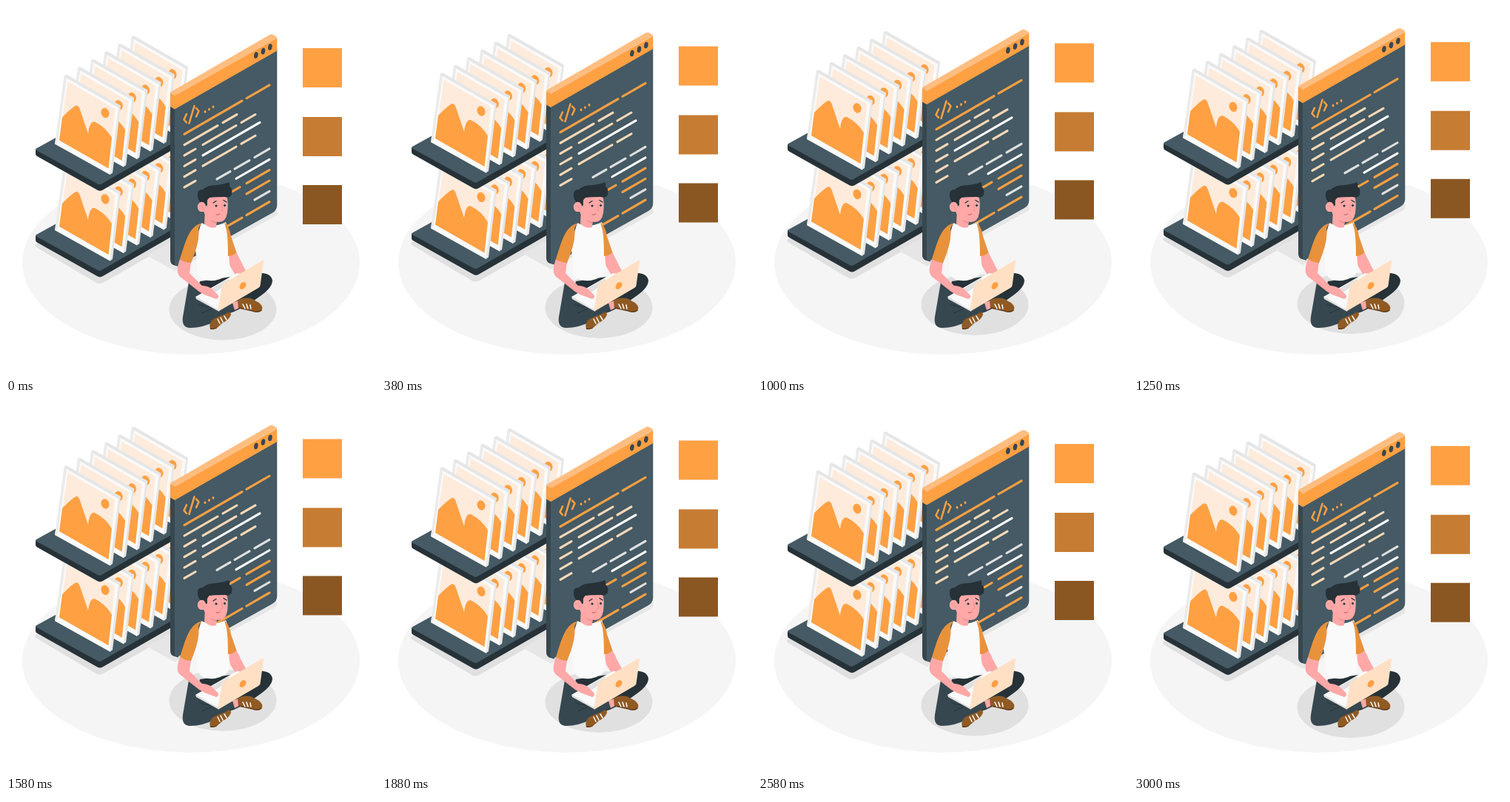
These frames come from a looping animation (500x500 px, 3.04 s). An HTML page:

```html
<!DOCTYPE html>
<html lang="en">
<head>
<meta charset="utf-8">
<title>Developer at work</title>
<style>
html, body { margin: 0; width: 100%; height: 100%; overflow: hidden; background: #fff; }
svg { display: block; width: 100vw; height: 100vh; }
.line { fill: none; stroke-linecap: round; stroke-linejoin: round; }
</style>
</head>
<body>
<svg viewBox="0 0 500 500">
  <defs>
    <g id="photo">
      <path fill="#e6e6e6" d="M78.500 95L80 93L82.500 93L155 134.500L144 225.500L140.500 228L100 190Z"/>
      <path fill="#fafafa" d="M79.500 96L152 137.500L140.500 228L66 186.500Z"/>
      <path fill="#ebebeb" d="M78.500 95L82 98L69.500 184L66 186.500Z"/>
      <path fill="#ffebdb" d="M83.500 102L147.500 139L138.500 219.500L72 181.500Z"/>
      <path fill="#ffa043" d="M76 150.500Q90 136 95 134.500Q98 134 100 140L111 172.500Q113 155 120 156.500Q135 164 143 178L138.500 219.500L72 181.500Z"/>
      <ellipse fill="#ffa043" cx="134" cy="144.500" rx="5.400" ry="6.800" transform="rotate(-20 134 144.500)"/>
    </g>
    <g id="shelf">
      <path fill="#263238" d="M40 194V200Q40 202 42 203L124 249Q127 250.500 130 249L224 195V184L127 238Z"/>
      <path fill="#455a64" d="M41 195Q39 194 41 192.500L120 149H224V186L129 240.500Q127 242 124 240.500Z"/>
      <g class="row"></g>
    </g>
  </defs>

  <ellipse cx="250" cy="347" rx="228" ry="124" fill="#f5f5f5"/>

  <g id="float">
    <g fill="#e0e0e0">
      <path d="M41 321Q37 323 41 326L122 374Q126 376 131 374L226 320V300Z"/>
      <path fill="#e6e6e6" d="M190 337L228 358L364 284Q368 281 366 276L330 260Z"/>
      <ellipse cx="293" cy="410" rx="72.500" ry="41.500"/>
    </g>

    <use href="#shelf" y="116.400"/>
    <use href="#shelf"/>

    <path fill="#37474f" d="M222 130V343Q222 348 226 350L233 352V130Z"/>
    <path fill="#455a64" d="M228 136V347Q228 353 234 350L360 279.500Q366.300 276 366.300 269V58Z"/>
    <path fill="#ffa043" d="M222 117L228 121L366.300 43V60.500L228 139.500L222 136Z"/>
    <path fill="#ffbd80" d="M222 116.500L356 39Q358.500 37.500 361 38.800L365 41Q367 42.500 365 43.500L228 121.500Z"/>
    <g fill="#37474f">
      <ellipse cx="338" cy="66.500" rx="2.700" ry="4.400" transform="rotate(12 338 66)"/>
      <ellipse cx="347.500" cy="61" rx="2.700" ry="4.400" transform="rotate(12 347 61)"/>
      <ellipse cx="357" cy="55.500" rx="2.700" ry="4.400" transform="rotate(12 357 55)"/>
    </g>
    <path class="line" stroke="#ffa043" stroke-width="2.500" d="M244 146L240.500 153.500L244 157.500M254.500 135L247.500 158.500M257 138L260.500 142L257 149.500"/>
    <path class="line" stroke="#ffa043" stroke-width="2.800" d="M269 142.500v.8M274.500 139.300v.8M280 136v.8"/>
    <g id="code" class="line" stroke-width="3.100"></g>

    <rect x="401" y="57" width="53" height="53" fill="#ffa043"/>
    <rect x="401" y="150" width="53" height="53" fill="#c67c33"/>
    <rect x="401" y="242" width="53" height="53" fill="#8a5723"/>
  </g>

  <g id="person">
    <!-- legs and shoes -->
    <path fill="#263238" d="M262 372L338 361Q358 359 360 371Q360 380 345 391Q320 410 297 417L270 428L254 410Z"/>
    <path fill="#37474f" d="M247 373L239 420Q237 434 248 435Q266 435 283 426L313 408L308 399L286 405L268 378Z"/>
    <path class="line" stroke="#263238" stroke-width="1" d="M286 405Q270 409 261 403M286 405L265 415"/>
    <path fill="#ffa8a7" d="M306 401L314 398L315 408L309 411Z"/>
    <path fill="#8f5a24" d="M276 437Q273 427 282 422L297 416Q304 411 304 417Q302 424 293 428L284 436Z"/>
    <path fill="#8f5a24" d="M313 398Q320 393 331 395L342 401Q349 407 345 412Q340 415 332 411L314 408Z"/>
    <path class="line" stroke="#5f3a16" stroke-width="1.500" d="M315 408L333 412Q341 415 345 411M277 436Q281 437 284 435"/>
    <path class="line" stroke="#fff" stroke-width="1.500" d="M286 423L289 429M290 421L293 427M295 419L298 424M320 403L323 409M325 403L327 409M330 404L331 409"/>

    <!-- torso and arms -->
    <path fill="#ffa8a7" d="M300 337L311 332L322 354L326 360L312 367L303 352Z"/>
    <path fill="#fafafa" d="M264 293Q280 301 297 292Q303 304 301 324L302 358Q298 368 282 371Q270 372 263 367Q257 361 258 345L255 322Z"/>
    <path fill="#e8923c" d="M266 293C248 297 244 314 235 342Q242 347 250 347.500C258 328 262 312 260 301Q261 296 266 293Z"/>
    <path fill="#e8923c" d="M295 292Q302 298 304 311L311.500 333Q307 338 300 338Q300 315 298 303Z"/>

    <!-- head -->
    <path fill="#ffa8a7" d="M269 276L268 294Q276 302 284 299L285 288Z"/>
    <path fill="#ffa8a7" d="M266 256H298Q301 265 299 280Q297 292 288 292Q276 291 270 284L266 276Z"/>
    <path fill="#f28f8f" d="M275 288Q280 291.500 285 292L284 294Q278 292.500 275 288Z"/>
    <path fill="#263238" d="M262 265Q257 256 260 250Q262 248 266 248Q271 242 285 242Q298 240 301 238Q303 240 302 244Q307 247 305 255Q302 260 296 258Q283 258 275 259Q271 261 272 269L270 271Q266 267 262 265Z"/>
    <ellipse cx="264.500" cy="271.500" rx="5.700" ry="6.800" fill="#ffa8a7"/>
    <path class="line" stroke="#f28f8f" d="M262 270Q266 270 267 275M291 268L293 276L290 277"/>
    <path class="line" stroke="#263238" stroke-width="1.400" d="M280 266L284 263.500M294 262.500L298 265"/>
    <path class="line" stroke="#b35f60" d="M284 282Q287 283 289 281"/>
    <circle cx="284" cy="270" r="1.500" fill="#263238"/>
    <circle cx="295.500" cy="269.500" r="1.500" fill="#263238"/>

    <!-- laptop -->
    <path fill="#e0e0e0" d="M256 393L288 410V413L257 396Z"/>
    <path fill="#fafafa" d="M256 393L312 361L330 363L288 411Z"/>
    <path fill="#e0e0e0" d="M274 384L300 369L306 372L282 387Z"/>
    <path fill="#ffa8a7" d="M235 342C230 356 230 363 238 368L261 386Q268 391 276 393L284 396Q289 394 286 390L278 382Q272 378 265 378L248 361L250 347Q242 347 235 342Z"/>
    <path fill="#ffe0c4" d="M294 375L346 344Q348.500 343 348 346L343.500 378Q343 380 341 381L289 411.500Q286 413 286.500 410L292 378Q292.300 376 294 375Z"/>
    <ellipse cx="320" cy="378" rx="3.800" ry="5.400" fill="#ffa043" transform="rotate(38 320 378)"/>
  </g>
</svg>
<script>
const LOOP = 3040, RISE = 10;
const $ = q => document.querySelector(q);
const orange = '#ffa043', peach = '#ffd9b8', white = '#fff', grey = '#e0e0e0';

// Six photos per shelf, back to front.
$('.row').innerHTML = [5, 4, 3, 2, 1, 0]
  .map(i => `<use href="#photo" x="${i * 18.2}" y="${i * -10.5}"/>`).join('');

// Code strokes: row, start x, end x, colour.
const strokes = [
  [0, 241, 319, orange], [0, 325, 356, orange],
  [1, 241, 286, peach], [1, 293, 312, peach],
  [2, 241, 256, peach], [2, 266, 311, peach], [2, 318, 337, peach],
  [3, 241, 256, peach], [3, 266, 343, white],
  [4, 241, 256, peach], [4, 266, 311, peach], [4, 318, 337, peach],
  [5, 241, 256, peach],
  [6, 285, 303, grey], [6, 309, 329, grey], [6, 336, 356, grey],
  [7, 311, 356, white],
  [8, 285, 316, orange], [8, 325, 356, orange],
  [9, 325, 356, orange],
  [10, 336, 356, grey],
  [11, 285, 319, orange], [11, 325, 356, orange]
];
const lineY = (row, x) => 173.8 + row * 14.35 - (x - 240) * 0.577;
$('#code').innerHTML = strokes.map(([row, a, b, color]) =>
  `<path stroke="${color}" d="M${a} ${lineY(row, a)}L${b} ${lineY(row, b)}"/>`).join('');

const float = $('#float');
const start = performance.now();
function draw(now) {
  const p = Math.max(0, now - start) % LOOP / LOOP;
  const lift = RISE * (1 - Math.abs(1 - 2 * p));
  float.setAttribute('transform', `translate(0 ${-lift})`);
  requestAnimationFrame(draw);
}
draw(start);
</script>
</body>
</html>
```
